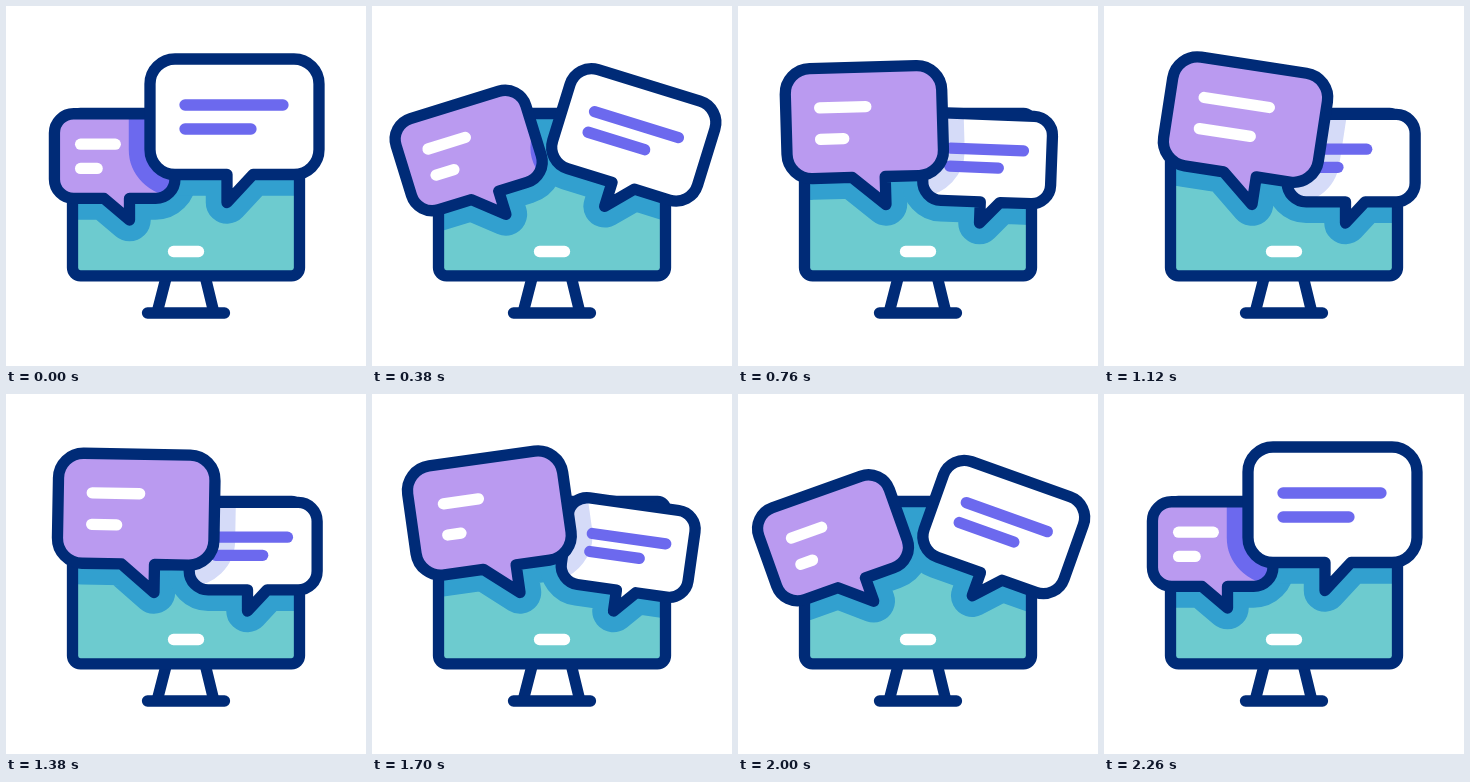
These frames come from a looping animation (360 px wide and 360 px high, 2400 ms). An HTML page with a canvas:

```html
<!DOCTYPE html>
<html lang="en">
<head>
<meta charset="utf-8">
<title>Chat bubbles</title>
<style>
html, body { margin: 0; width: 100%; height: 100%; overflow: hidden; background: #fff; }
canvas { display: block; }
</style>
</head>
<body>
<canvas id="stage" width="360" height="360"></canvas>
<script>
const ctx = document.getElementById('stage').getContext('2d');
const LOOP = 2400, MIDDLE = 1200;
const NAVY = '#002b77', TEAL = '#6dcbcf', BLUE = '#32a0cf', VIOLET = '#6c69ee';
const STROKE = 11.3, SHADOW = 42.5;

const mix = (a, b, p) => a + (b - a) * p;

// Smooth step from 0 at a to 1 at b
function ease(t, a, b) {
  const u = Math.min(1, Math.max(0, (t - a) / (b - a)));
  return u * u * (3 - 2 * u);
}

const bump = (t, a, peak, b) => ease(t, a, peak) * (1 - ease(t, peak, b));

// The bubbles trade places and back, mirrored in time around the middle of the loop.
function motion(t) {
  const d = Math.abs(t - MIDDLE);
  return {
    swap: 1 - ease(d, 600, 1000),
    lean: 26.5 * bump(d, 385, 700, 1000),
    sway: bump(t, 700, 1120, 1450),
    retract: bump(t, 1400, 1850, 2250),
    leftInFront: d < 695
  };
}

// Bubble coordinates are relative to the tip of the tail, at full size.
const left = {
  tip: [[123.5, 214], [148, 198.5]], size: [.77, 1], arc: [0, 1],
  box: [-97.5, -138, 59, -28], tail: [-33, 0],
  fill: '#ba9af0', shade: VIOLET, ink: '#fff', textX: -63.5,
  angle: m => 8.7 * m.sway - m.lean,
  lines: [
    { y: -98.5, length: m => 45 + 21 * m.sway - 13 * m.retract },
    { y: -67, length: m => 21.5 + 30 * m.sway - 11 * m.retract }
  ]
};
const right = {
  tip: [[221, 196.5], [241.5, 217]], size: [1, .757], arc: [3, -5],
  box: [-77, -143.5, 92, -28], tail: [0, 26],
  fill: '#fff', shade: '#d5dbf8', ink: VIOLET, textX: -42,
  angle: m => m.lean,
  lines: [
    { y: -97.5, length: m => 98 - 28 * m.sway },
    { y: -73.5, length: m => 66 - 34 * m.sway }
  ]
};

function outline(b, s) {
  const [x0, y0, x1, y1] = b.box.map(v => v * s);
  const r = 25 * s, path = new Path2D();
  path.moveTo(b.tail[0] * s, y1);
  path.arcTo(x0, y1, x0, y0, r);
  path.arcTo(x0, y0, x1, y0, r);
  path.arcTo(x1, y0, x1, y1, r);
  path.arcTo(x1, y1, x0, y1, r);
  path.lineTo(b.tail[1] * s, y1);
  path.lineTo(0, 0);
  path.closePath();
  return path;
}

function update(b, m) {
  const p = m.swap, bow = 4 * p * (1 - p), [from, to] = b.tip;
  b.x = mix(from[0], to[0], p) + b.arc[0] * bow;
  b.y = mix(from[1], to[1], p) + b.arc[1] * bow;
  b.scale = mix(b.size[0], b.size[1], p);
  b.turn = b.angle(m) * Math.PI / 180;
  b.path = outline(b, b.scale);
}

function place(b) {
  ctx.resetTransform();
  ctx.translate(b.x, b.y);
  ctx.rotate(b.turn);
}

function stroke(path, color, width = STROKE) {
  ctx.strokeStyle = color;
  ctx.lineWidth = width;
  ctx.stroke(path);
}

function segment(x0, y0, x1, y1, color) {
  const path = new Path2D();
  path.moveTo(x0, y0);
  path.lineTo(x1, y1);
  stroke(path, color);
}

function castShadow(b, color) {
  place(b);
  stroke(b.path, color, SHADOW);
}

function drawBubble(b, m, above) {
  ctx.save();
  place(b);
  ctx.fillStyle = b.fill;
  ctx.fill(b.path);
  if (above) {
    ctx.save();
    ctx.clip(b.path);
    castShadow(above, b.shade);
    ctx.restore();
  }
  const s = b.scale, x = b.textX * s;
  for (const { y, length } of b.lines) segment(x, y * s, x + length(m) * s, y * s, b.ink);
  stroke(b.path, NAVY);
  ctx.restore();
}

const screen = new Path2D();
screen.roundRect(66.5, 107.5, 227, 162.3, 8);

function drawMonitor() {
  segment(160, 272, 151.5, 305, NAVY);
  segment(199.5, 272, 207.5, 305, NAVY);
  segment(141.5, 307, 218.5, 307, NAVY);
  ctx.save();
  ctx.fillStyle = TEAL;
  ctx.fill(screen);
  ctx.clip(screen);
  castShadow(left, BLUE);
  castShadow(right, BLUE);
  ctx.restore();
  segment(167.5, 245.5, 192.5, 245.5, '#fff');
  stroke(screen, NAVY);
}

function draw(t) {
  const m = motion(t);
  ctx.resetTransform();
  ctx.fillStyle = '#fff';
  ctx.fillRect(0, 0, 360, 360);
  ctx.lineCap = ctx.lineJoin = 'round';
  update(left, m);
  update(right, m);
  drawMonitor();
  const [back, front] = m.leftInFront ? [right, left] : [left, right];
  drawBubble(back, m, front);
  drawBubble(front, m);
}

let start;
function frame(now) {
  start ??= now;
  draw((now - start) % LOOP);
  requestAnimationFrame(frame);
}
requestAnimationFrame(frame);
</script>
</body>
</html>
```
